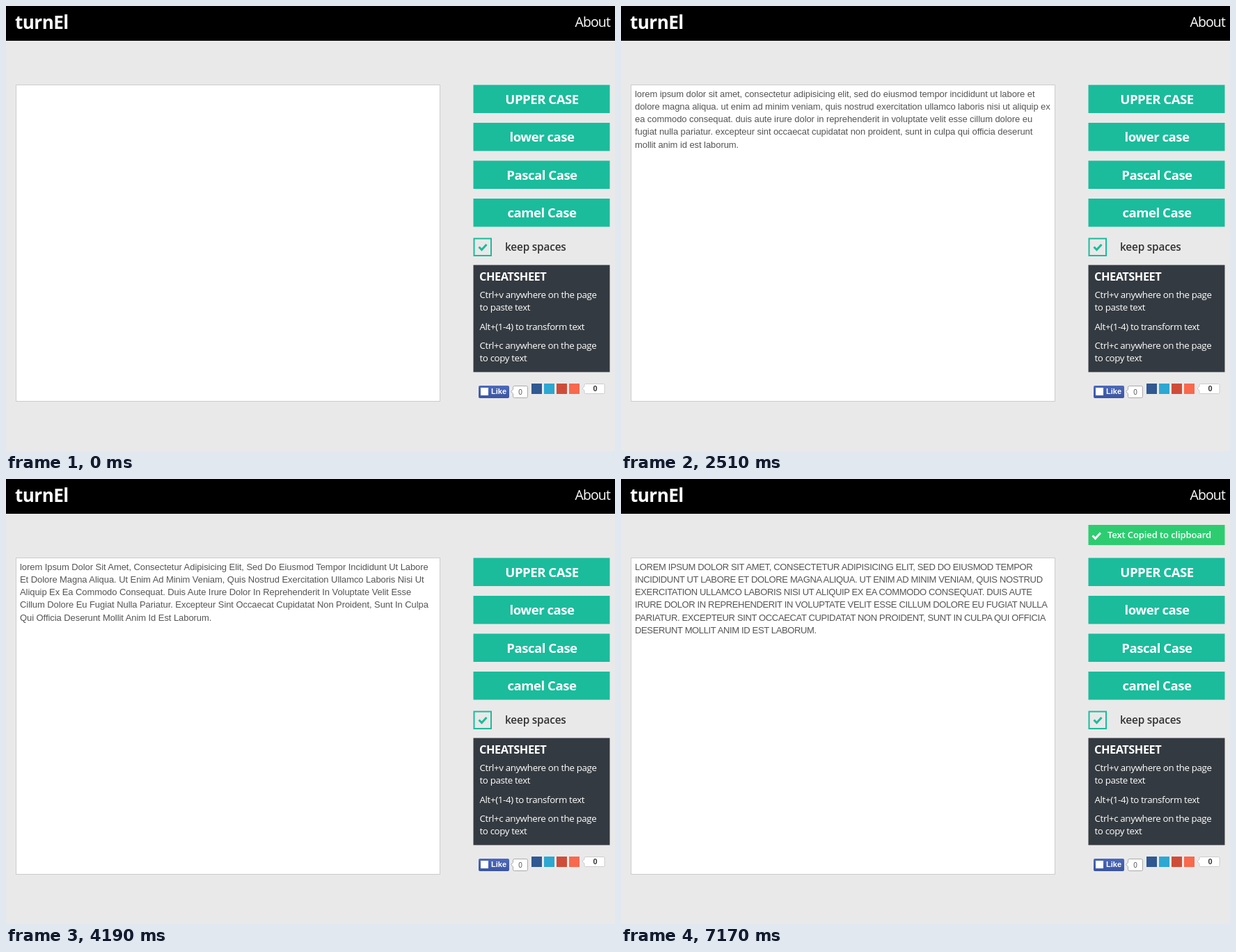
An HTML page that plays this animation: 875x640 px, repeating every 8000 ms.

```html
<!DOCTYPE html>
<html lang="en">
<head>
<meta charset="utf-8">
<title>Case converter</title>
<style>
  html, body { margin: 0; width: 100%; height: 100%; overflow: hidden; background: #e9e9e9; }
  svg { position: absolute; left: 0; top: 0; font-family: "Open Sans", "Noto Sans", sans-serif; }
  #copy { position: absolute; left: 20px; top: 118px; font: 13px/18.15px "Liberation Sans", Arial, sans-serif; letter-spacing: -.07px; color: #555; white-space: pre; }
  #copy.caps { letter-spacing: -.36px; }
  .bold { font-weight: 700; }
  .semi { font-weight: 600; }
  .button { font-size: 18.6px; letter-spacing: -.5px; text-anchor: middle; }
  .note { font-size: 13.3px; letter-spacing: -.35px; }
  .count { font-family: "Liberation Sans", Arial, sans-serif; text-anchor: middle; }
  .tick { fill: none; stroke-width: 3; }
</style>
</head>
<body>
<svg width="875" height="640" viewBox="0 0 875 640" fill="#fff">
  <defs>
    <linearGradient id="like" x2="0" y2="1"><stop stop-color="#4c69ba"/><stop offset="1" stop-color="#3b55a0"/></linearGradient>
  </defs>
  <rect width="875" height="50" fill="#000"/>
  <text class="bold" x="13" y="33" font-size="26" letter-spacing="-.5">turnEl</text>
  <text x="817.5" y="30" font-size="19.5" letter-spacing="-.9">About</text>
  <rect x="14.5" y="113.5" width="609" height="455" stroke="#ccc"/>

  <g id="buttons"></g>

  <rect x="672.5" y="334.5" width="24.5" height="24.5" fill="none" stroke="#1abc9c" stroke-width="2"/>
  <path class="tick" d="M679.5 346.5l4 4 7-7.5" stroke="#1abc9c"/>
  <text class="semi" x="717" y="352" font-size="15.4" letter-spacing="-.2" fill="#333">keep spaces</text>

  <rect x="671.5" y="372.5" width="196" height="154" fill="#343a41"/>
  <text class="bold" x="680" y="395" font-size="16.4" letter-spacing="-.5">CHEATSHEET</text>
  <g class="note">
    <text x="680.5" y="420">Ctrl+v anywhere on the page</text>
    <text x="680.5" y="438">to paste text</text>
    <text x="680.5" y="466">Alt+(1-4) to transform text</text>
    <text x="680.5" y="493">Ctrl+c anywhere on the page</text>
    <text x="680.5" y="511">to copy text</text>
  </g>

  <rect x="679" y="546" width="44" height="18" rx="2" fill="url(#like)"/>
  <rect x="682" y="549" width="11" height="11"/>
  <text x="697" y="558" font-family="Liberation Sans, Arial, sans-serif" font-size="11" font-weight="700">Like</text>
  <path d="M730.5 546.5h17q2 0 2 2v13q0 2-2 2h-17q-2 0-2-2v-4l-3-3 3-3v-3q0-2 2-2z" stroke="#aaa"/>
  <text class="count" x="739" y="558.5" font-size="10" fill="#555">0</text>
  <path d="M755 543h15v15h-15z" fill="#305891"/>
  <path d="M773 543h15v15h-15z" fill="#2ca8d2"/>
  <path d="M791 543h15v15h-15z" fill="#ce4d39"/>
  <path d="M809 543h15v15h-15z" fill="#f8694d"/>
  <path d="M832.5 543.5h26q1.5 0 1.5 1.5v11q0 1.5-1.5 1.5h-26q-1.5 0-1.5-1.5v-3l-3-3 3-3v-2q0-1.5 1.5-1.5z" stroke="#ccc"/>
  <text class="count" x="846.5" y="554" font-size="11" font-weight="700" fill="#333">0</text>

  <g id="toast">
    <rect x="671.5" y="66" width="196" height="29" fill="#2ecc71"/>
    <path class="tick" d="M677.5 81.5l4 4 7.5-8" stroke="#fff"/>
    <text class="semi" x="699" y="85" font-size="13" letter-spacing="-.1">Text Copied to clipboard</text>
  </g>
</svg>
<div id="copy"></div>
<script>
const $ = id => document.getElementById(id);

$("buttons").innerHTML = ["UPPER CASE", "lower case", "Pascal Case", "camel Case"].map((label, i) => {
  const y = 113.5 + 54.5 * i;
  return `<rect x="671.5" y="${y}" width="196" height="40.5" fill="#1abc9c"/>
    <text class="button bold" x="770" y="${Math.floor(y + 27.5)}">${label}</text>`;
}).join("");

const lorem = "Lorem ipsum dolor sit amet, consectetur adipisicing elit, sed do eiusmod tempor incididunt ut labore et " +
  "dolore magna aliqua. Ut enim ad minim veniam, quis nostrud exercitation ullamco laboris nisi ut aliquip ex " +
  "ea commodo consequat. Duis aute irure dolor in reprehenderit in voluptate velit esse cillum dolore eu " +
  "fugiat nulla pariatur. Excepteur sint occaecat cupidatat non proident, sunt in culpa qui officia deserunt " +
  "mollit anim id est laborum.";

// Breaks the text before the words with the given indices.
const wrap = (text, ...starts) =>
  text.split(" ").map((word, i) => (starts.includes(i) ? "\n" : i ? " " : "") + word).join("");

const plain = wrap(lorem, 16, 33, 49, 64);
const upper = wrap(lorem.toUpperCase(), 12, 26, 38, 51, 63);
const pascal = wrap(lorem.replace(/\b\w/g, c => c.toUpperCase()), 15, 31, 46, 61);
const camel = "l" + pascal.slice(1);

const scenes = [[0, ""], [1030, plain], [2050, upper], [2510, plain.toLowerCase()],
  [3160, pascal], [4190, camel], [5120, upper]];
const fade = [[0, 0], [6990, .3], [7080, .7], [7170, 1]];
const at = (steps, t) => steps.findLast(([start]) => start <= t)[1];

const begin = performance.now();
function draw(now) {
  const t = Math.max(0, now - begin) % 8000;
  const text = at(scenes, t);
  if ($("copy").textContent !== text) {
    $("copy").textContent = text;
    $("copy").className = text === upper ? "caps" : "";
  }
  $("toast").setAttribute("opacity", at(fade, t));
  requestAnimationFrame(draw);
}
draw(begin);
</script>
</body>
</html>
```
